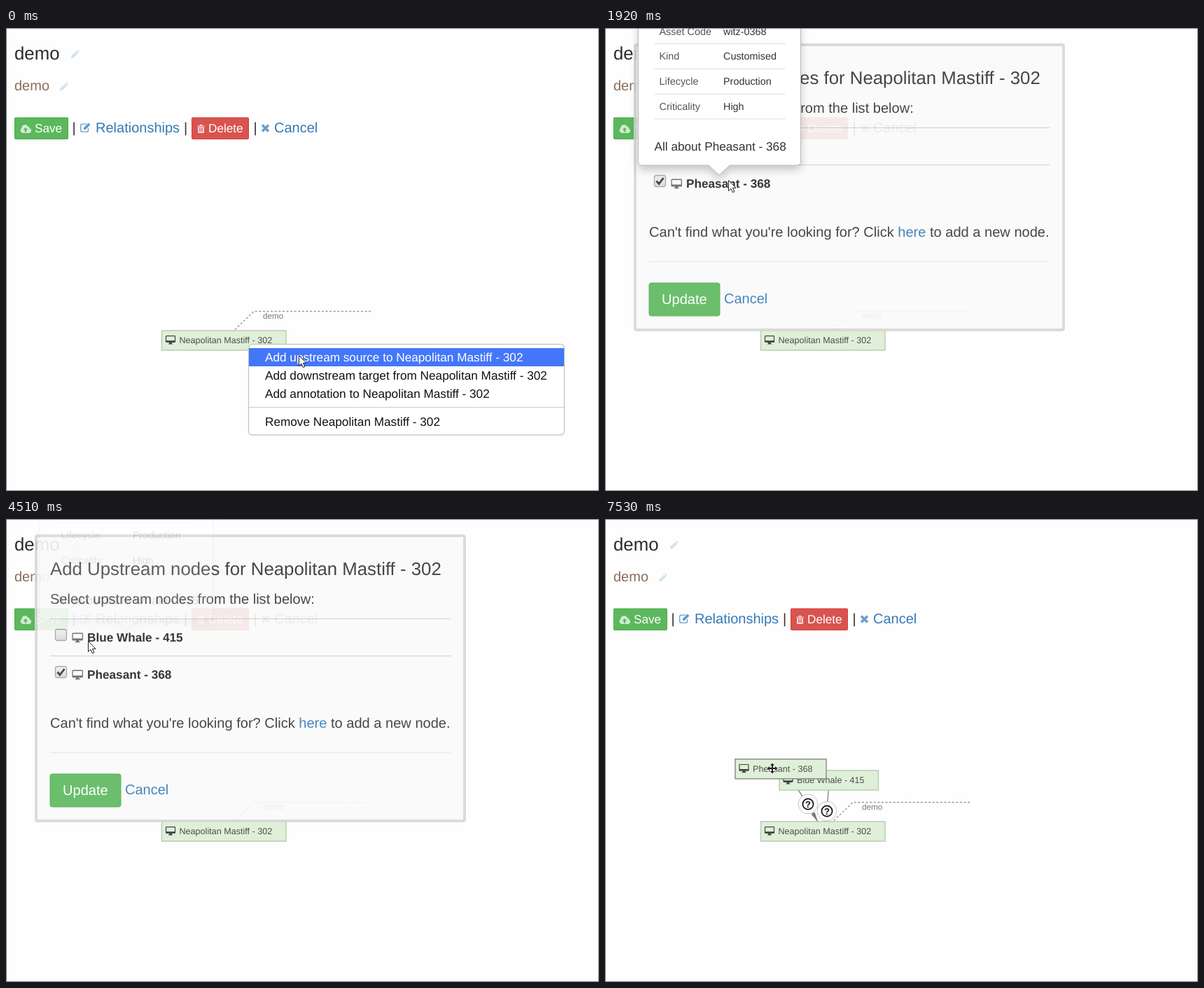
An HTML page that plays this animation: 847 by 661 pixels, repeating every 8000 ms.

```html
<!DOCTYPE html>
<html lang="en">
<head>
<meta charset="utf-8">
<title>Add upstream nodes</title>
<style>
  html, body { margin: 0; width: 100%; height: 100%; overflow: hidden; background: #fefefe; }
  svg { display: block; width: 847px; height: 661px; font-family: "Liberation Sans", Arial, sans-serif; }
  text { text-rendering: geometricPrecision; white-space: pre; }
  .pop { filter: drop-shadow(0 6px 6px rgba(0, 0, 0, .2)); }
</style>
</head>
<body>
<svg id="stage" viewBox="0 0 847 661" xmlns="http://www.w3.org/2000/svg"></svg>
<script>
const LOOP = 8000;
const LINK = '#337ab7';

const text = (x, y, size, fill, str, extra = '') =>
  `<text x="${x}" y="${y}" font-size="${size}" fill="${fill}" ${extra}>${str}</text>`;
const rect = (x, y, w, h, fill, stroke = 'none', r = 0, extra = '') =>
  `<rect x="${x}" y="${y}" width="${w}" height="${h}" rx="${r}" fill="${fill}" stroke="${stroke}" ${extra}/>`;
const line = (d, stroke, extra = '') => `<path d="${d}" fill="none" stroke="${stroke}" ${extra}/>`;
const group = (id, body, extra = '') => `<g id="${id}" ${extra}>${body}</g>`;
const at = (x, y, body, extra = '') => `<g transform="translate(${x} ${y})" ${extra}>${body}</g>`;

// Icons
const desktop = (x, y, color, s = 1) => at(x, y, `<g transform="scale(${s})">
  <path d="M1.2 .7H12.8Q13.5 .7 13.5 1.4V8.6Q13.5 9.3 12.8 9.3H1.2Q.5 9.3 .5 8.6V1.4Q.5 .7 1.2 .7Z" fill="none" stroke="${color}" stroke-width="1.2"/>
  <path d="M.5 7.3H13.5V9.5H8.6L9 11.4H10V12.5H4V11.4H5L5.4 9.5H.5Z" fill="${color}"/></g>`);
const pencil = (x, y) => at(x, y, `<path d="M0 12L.9 8.3L7.2 2L10 4.8L3.7 11.1Z M8 1.2L9.2 0L12 2.8L10.8 4Z" fill="#c9dfee"/>
  <path d="M2.5 8.6L7.5 3.6" stroke="#fff" stroke-width=".7"/>`);
const cloud = at(20, 138, `<path d="M4 12A4 4 0 0 1 2.4 4.8A4.8 4.8 0 0 1 11.5 2.8A2.8 2.8 0 0 1 14 5.6A3.3 3.3 0 0 1 13.2 12Z" fill="#fff"/>
  <path d="M8 4L11.5 7.5H9.2V10.5H6.8V7.5H4.5Z" fill="#5cb85c"/>`, 'opacity=".72"');
const edit = at(106, 135, `<path d="M11.5 8V11Q11.5 13.2 9.3 13.2H2.9Q.7 13.2 .7 11V4.4Q.7 2.2 2.9 2.2H9" fill="none" stroke="${LINK}" stroke-width="1.3"/>
  <path d="M5 10V7.3L11.8 .5L14.5 3.2L7.7 10Z" fill="${LINK}"/>`, 'opacity=".75"');
const trash = at(273, 137, `<path d="M0 2.5H3.2L4 .7H7L7.8 2.5H11V3.6H0Z M1 4.3H10V11.8Q10 13 9 13H2Q1 13 1 11.8Z" fill="#fff"/>
  <path d="M3.5 5.5V11M5.5 5.5V11M7.5 5.5V11" stroke="#d9534f" stroke-width=".9"/>`, 'opacity=".75"');
const cross = line('M366 138.5L375 147.5M375 138.5L366 147.5', LINK, 'stroke-width="3.6" opacity=".72"');

const bar = x => text(x, 148.5, 20, '#333', '|');
const toolbar =
  text(12, 44.5, 25.8, '#2b2b2b', 'demo') + pencil(93, 31) +
  text(12, 89, 20, '#8a6d5b', 'demo') + pencil(77, 77.5) +
  rect(12.5, 128, 76, 30.5, '#5cb85c', '#4cae4c', 1) + cloud + text(41, 149, 17.2, '#fff', 'Save') + bar(94.5) +
  edit + text(128, 148.5, 20, LINK, 'Relationships') + bar(254) +
  rect(265.5, 128, 81, 30.5, '#d9534f', '#d43f3a', 1) + trash + text(289, 149, 17.2, '#fff', 'Delete') + bar(353.5) +
  cross + text(383, 148.5, 20, LINK, 'Cancel');

// Graph
const node = (x, y, w, label, id = '') =>
  rect(x, y, w, 28, '#dff0d8', '#bfcabb', 0, `stroke-width="1.5" ${id}`) +
  desktop(x + 5.5, y + 7, '#444') + text(x + 25, y + 18, 12.6, '#4d4d4d', label);
const badge = (x, y) => at(x, y, `<circle r="13.8" fill="#fff" stroke="#c4c4c4"/>
  <circle r="7.6" fill="none" stroke="#111" stroke-width="1.7"/>` +
  text(0, 4.6, 13, '#111', '?', 'font-weight="bold" text-anchor="middle"'));
const graph =
  line('M327 430.5L354 404.5H521', '#999', 'stroke-width="1.4" stroke-dasharray="3 2.6"') +
  text(367, 415, 11.7, '#777', 'demo') +
  group('links', line('M272 380L304 432M320 380L315 432', '#8c8c8c', 'stroke-width="1.5"') +
    '<path d="M304 432L294.5 421.5L299.5 418.5Z" fill="#777"/>') +
  node(222.5, 432, 177.5, 'Neapolitan Mastiff - 302') +
  group('sources', node(249, 359, 141.5, 'Blue Whale - 415') + badge(290, 407) + badge(317, 417) +
    node(186, 342.8, 130, 'Pheasant - 368', 'id="pheasantBox"'));

// Context menu
const menuItem = (y, label, fill = '#111') => text(370, y, 17.2, fill, label);
const menu =
  rect(346.5, 451.5, 451, 129.5, '#fff', '#c6c6c6', 5, 'stroke-width="1.3"') +
  rect(347, 457, 450, 26, '#4477f8') +
  menuItem(476, 'Add upstream source to Neapolitan Mastiff - 302', '#fff') +
  menuItem(502, 'Add downstream target from Neapolitan Mastiff - 302') +
  menuItem(528, 'Add annotation to Neapolitan Mastiff - 302') +
  line('M347 541.5H797', '#ccc') +
  menuItem(568, 'Remove Neapolitan Mastiff - 302');

// Dialog
const option = (id, y, label) =>
  rect(70.5, y - 17.5, 16, 16, 'url(#box)', '#a3a3a3', 3, `id="${id}Box" stroke-width="1.3"`) +
  line(`M73.5 ${y - 9.5}L77 ${y - 5.5}L83.5 ${y - 14}`, '#333', `id="${id}Tick" stroke-width="2.8"`) +
  desktop(94.5, y - 12.5, '#6b6560', 1.1) + text(116, y, 17.2, '#222', label, 'font-weight="bold"');
const dialog =
  rect(43, 24, 612, 407, '#fafafa', '#d8d8d8', 2, 'stroke-width="4"') +
  text(63, 80, 25.8, '#333', 'Add Upstream nodes for Neapolitan Mastiff - 302') +
  text(63, 120.5, 20.06, '#333', 'Select upstream nodes from the list below:') +
  line('M63 142.5H635M63 195.5H635', '#ccc') +
  option('whale', 175, 'Blue Whale - 415') + option('bird', 228, 'Pheasant - 368') +
  text(63, 297.5, 20.06, '#333', `Can't find what you're looking for? Click <tspan fill="${LINK}">here</tspan> to add a new node.`) +
  line('M63 333.5H635', '#e3e3e3') +
  rect(63, 364, 101, 47, '#5cb85c', '#4cae4c', 3, 'id="update"') +
  text(81, 394, 20.06, '#fff', 'Update') + text(170, 392.5, 20, LINK, 'Cancel');

// Hover card whose tail points down at (tipX, tipY)
const card = (left, right, tipX, tipY, valueX, code, title) => {
  const base = tipY - 14;
  const rows = [['Asset Code', code], ['Kind', 'Customised'], ['Lifecycle', 'Production'], ['Criticality', 'High']];
  return `<path d="M${left} -90H${right}V${base - 6}q0 6 -6 6H${tipX + 15}L${tipX} ${tipY}L${tipX - 15} ${base}H${left + 6}q-6 0 -6 -6Z" fill="#fff" stroke="#bbb"/>` +
    rows.map(([key, value], i) => {
      const y = tipY - 200.5 + i * 35.8;
      return text(left + 30, y, 14.4, '#555', key) + text(valueX, y, 14.4, '#333', value) +
        line(`M${left + 23} ${y + 13}H${right - 22}`, '#ddd');
    }).join('') +
    text(left + 23, tipY - 35, 17.2, '#333', title);
};

// Pointers
const ink = 'fill="#fff" stroke="#222" stroke-width="1" stroke-linejoin="round"';
const arrow = `<path d="M.5 .5V15.5L4 12.3L6.4 17.7L8.9 16.6L6.5 11.3H11Z" ${ink}/>`;
const hand = `<path d="M4.5 12V2Q4.5 .5 6 .5T7.5 2V7.5Q10 6.6 10.3 8.6Q12.6 8 12.8 10Q14.5 9.6 14.5 11.5V15Q14.5 17.5 13 19V21H5.5V19L.8 13Q-.3 11.2 1.3 10.6Q2.6 10.4 4.5 13Z" ${ink}/>
  <path d="M7.5 13V17M9.5 13V17M11.5 13V17" stroke="#777"/>`;
const move = `<path d="M0 -7.5L3 -4H1V-1H4V-3L7.5 0L4 3V1H1V4H3L0 7.5L-3 4H-1V1H-4V3L-7.5 0L-4 -3V-1H-1V-4H-3Z"
  fill="#222" stroke="#fff" stroke-width="1" paint-order="stroke"/>`;

document.getElementById('stage').innerHTML =
  `<defs><linearGradient id="box" x2="0" y2="1"><stop stop-color="#f0f0f0"/><stop offset="1" stop-color="#d8d8d8"/></linearGradient></defs>` +
  rect(0, 0, 847, 661, '#fefefe') + toolbar + group('graph', graph) + group('menu', menu) + group('dialog', dialog) +
  group('birdCard', card(47.5, 279.5, 163, 210, 169, 'witz-0368', 'All about Pheasant - 368'), 'class="pop"') +
  group('whaleCard', card(48.5, 295.5, 172, 157, 181, 'witz-0415', 'All about Blue Whale - 415'), 'class="pop"') +
  group('pointer', group('arrow', arrow) + group('hand', hand) + group('move', move)) +
  rect(.5, .5, 846, 660, 'none', '#7d7d7d');

// Step tables: [start in ms, value...]
const dialogFade = [[0, 0], [620, .3], [740, .65], [860, .9], [6740, 0]];
const birdFade = [[0, 0], [1780, .5], [1920, 1], [3140, .2], [3260, 0]];
const whaleFade = [[0, 0], [3380, .2], [3500, .5], [3620, .85], [3740, 1], [4510, .13], [4630, .06], [4750, 0]];
const buttonLook = [[0, '#5cb85c', '#4cae4c', 1], [6250, '#449d44', '#398439', 1], [6620, '#357f35', '#2b78d0', 2]];
const pointerKind = [[0, 'arrow'], [6250, 'hand'], [6740, 'arrow'], [7530, 'move']];
const pointerPath = [
  [0, 418, 467], [1140, 320, 389], [1260, 215, 305], [1380, 130, 232], [1500, 84, 217],
  [1780, 176, 217], [2320, 150, 217], [2440, 131, 217], [2590, 126, 217],
  [3260, 126, 204], [3380, 128, 186], [3500, 130, 174], [4020, 122, 174], [4140, 117, 174],
  [4630, 100, 169], [4750, 86, 165], [4900, 78, 163],
  [5860, 84, 205], [5980, 108, 295], [6100, 125, 354], [6250, 121, 375], [6370, 117, 390],
  [6740, 121, 391], [7170, 136, 387], [7290, 173, 374], [7410, 215, 360], [7530, 239, 356]
];

const el = id => document.getElementById(id);
const step = (table, t) => table.findLast(row => row[0] <= t).slice(1);
const show = (id, on) => el(id).setAttribute('display', on ? 'inline' : 'none');
const fade = (id, value) => { show(id, value > 0); el(id).setAttribute('opacity', value); };

function draw(t) {
  const [open] = step(dialogFade, t);
  fade('dialog', open);
  fade('birdCard', step(birdFade, t)[0]);
  fade('whaleCard', step(whaleFade, t)[0]);
  show('menu', t < 620);
  show('links', t >= 6740);
  show('sources', t >= 6740);
  el('graph').style.filter = open ? 'blur(.5px)' : 'none';
  el('pheasantBox').setAttribute('stroke', t >= 7530 ? '#8b9388' : '#bfcabb');

  show('birdTick', t >= 1650);
  show('whaleTick', t >= 5320);
  el('whaleBox').setAttribute('fill', t >= 5320 && t < 5580 ? '#d0d0d0' : 'url(#box)');

  const [fill, stroke, width] = step(buttonLook, t);
  const button = el('update');
  button.setAttribute('fill', fill);
  button.setAttribute('stroke', stroke);
  button.setAttribute('stroke-width', width);

  const [kind] = step(pointerKind, t);
  for (const id of ['arrow', 'hand', 'move']) show(id, id === kind);
  el('pointer').setAttribute('transform', `translate(${step(pointerPath, t).join(' ')})`);
}

const start = performance.now();
function tick(now) {
  draw(Math.max(0, now - start) % LOOP);
  requestAnimationFrame(tick);
}
draw(0);
requestAnimationFrame(tick);
</script>
</body>
</html>
```
